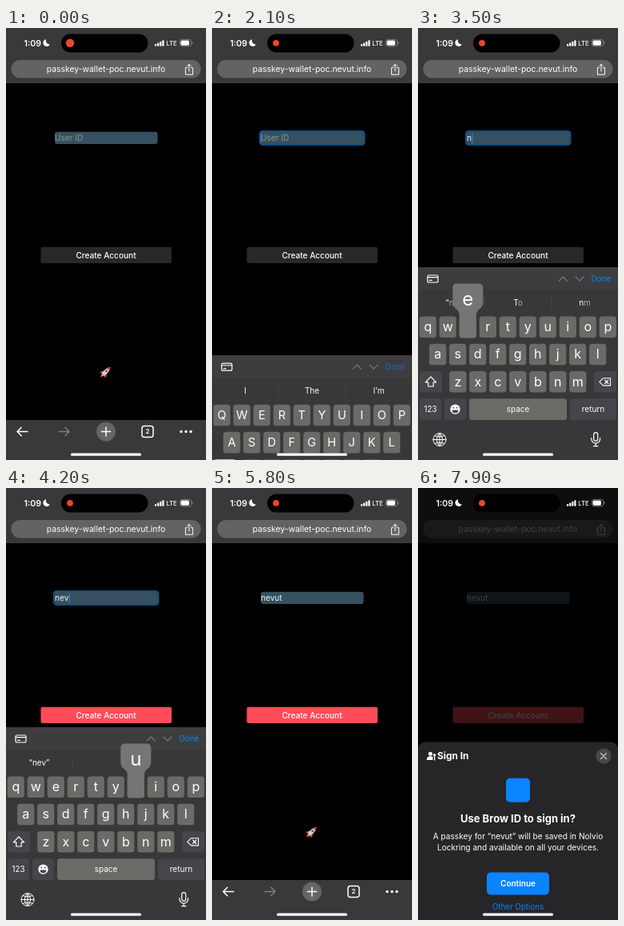
These frames come from a looping animation (250x540 px, 8000 ms). An HTML page:

```html
<!DOCTYPE html>
<html lang="en">
<head>
<meta charset="utf-8">
<title>Passkey sign-up</title>
<style>
html, body { margin: 0; width: 100%; height: 100%; overflow: hidden; background: #000; }
svg { display: block; width: 100%; height: 100%; }
text { font-family: Inter, "Open Sans", sans-serif; fill: #fff; }
.mid { text-anchor: middle; }
.line { fill: none; stroke: #fff; stroke-width: 1.5; stroke-linecap: round; stroke-linejoin: round; }
</style>
</head>
<body>
<svg id="stage" viewBox="0 0 250 540"></svg>
<script>
const LOOP = 8000, STEP = 100;
const USER = 'nevut';
const KEYBOARD_IN = 2000, SHIFT_OFF = 2900, KEYBOARD_OUT = 5300, SHEET_IN = 7400;
const KEY_PRESSES = [[3200, 3400], [3420, 3600], [3850, 4000], [4200, 4330], [4450, 4580]];
const BAR = '#39393b', KEY = '#6a6a67', FN_KEY = '#45454a', BLUE = '#0a84ff';

const label = (x, y, size, content, attrs = '') =>
  `<text x="${x}" y="${y}" font-size="${size}" ${attrs}>${content}</text>`;
const centred = (x, y, size, content, attrs = '') =>
  label(x, y, size, content, `class="mid" ${attrs}`);
const box = (x, y, w, h, r, fill, attrs = '') =>
  `<rect x="${x}" y="${y}" width="${w}" height="${h}" rx="${r}" fill="${fill}" ${attrs}/>`;
const line = (d, attrs = '') => `<path class="line" d="${d}" ${attrs}/>`;
const dot = (x, y, r, fill, attrs = '') => `<circle cx="${x}" cy="${y}" r="${r}" fill="${fill}" ${attrs}/>`;

const rows = [
  { letters: 'qwertyuiop', x: 12.3, y: 360.5 },
  { letters: 'asdfghjkl', x: 24.7, y: 394.7 },
  { letters: 'zxcvbnm', x: 49.8, y: 429 }
];
const keyAt = letter => {
  const row = rows.find(r => r.letters.includes(letter));
  return { x: row.x + row.letters.indexOf(letter) * 25, y: row.y };
};

function letterKeys() {
  return rows.map(row => [...row.letters].map(letter => {
    const { x, y } = keyAt(letter);
    return box(x - 10.6, y, 21.2, 26.6, 3.5, KEY) +
      centred(x, y + 18.6, 16, letter, `data-letter="${letter}"`);
  }).join('')).join('');
}

function statusBar() {
  const bars = [0, 1, 2, 3].map(i => box(186 + i * 3.1, 20 - i * 1.6, 2.2, 2.8 + i * 1.6, .7, '#fff')).join('');
  return label(22.5, 22.6, 10.6, '1:09', 'font-weight="600"') +
    '<path d="M50.2 14.2a4.4 4.4 0 1 0 4.6 6.2a4.5 4.5 0 0 1-4.6-6.2z" fill="#fff"/>' +
    box(69, 7.5, 108.5, 23, 11.5, '#000') + dot(80, 18.8, 4, '#e9472e', 'id="rec"') +
    bars + label(200.3, 22.3, 7.8, 'LTE', 'font-weight="500"') +
    box(217.3, 14.3, 14.4, 8.6, 2.7, 'none', 'stroke="#88888a" stroke-width=".8"') +
    box(218.5, 15.5, 10.5, 6.2, 1.6, '#fff') + box(232.4, 17, 1, 3.2, .5, '#88888a');
}

function page() {
  return box(0, 0, 250, 69, 0, BAR) + box(6.5, 40, 237, 22.5, 11, '#636361') +
    centred(125, 54.8, 10.4, `passkey-wallet-poc.${USER}.info`) +
    line('M226.4 49.6h-2v8.6h9v-8.6h-2M228.9 54v-8.4M226.6 47.6l2.3-2.3l2.3 2.3', 'style="stroke-width:1"') +
    box(59, 128, 132.5, 19, 4.5, '#10507f', 'id="ring"') +
    box(61, 129.7, 128.5, 15.4, 3, '#36505f') +
    '<text id="field" x="61" y="141.4" font-size="10.1"></text>' +
    box(0, 131.5, 1.2, 12, .5, '#3a78d8', 'id="caret"') +
    box(43.5, 273.7, 163.5, 20.3, 2, '#28282a', 'id="button"') +
    centred(125, 287.7, 10.1, 'Create Account', 'font-weight="500"') + rocket() + browserBar();
}

function rocket() {
  return `<g transform="translate(124.5 430) rotate(45)">
    <path d="M-1.7 4.5L0 9L1.7 4.5z" fill="#ff9b20"/>
    <path d="M-2.2 0L-4.6 3.2V6L-1.5 4.3H1.5L4.6 6V3.2L2.2 0z" fill="#d9382c"/>
    <path d="M0-8.5Q3.6-4 2.3 4.8H-2.3Q-3.6-4 0-8.5z" fill="#c9cfd0"/>
    <path d="M0-8.5Q1.7-6.6 2.3-4.6H-2.3Q-1.7-6.6 0-8.5z" fill="#d9382c"/>
    <circle cy="-1.6" r="1.4" fill="#31556e"/></g>`;
}

function browserBar() {
  return box(0, 490, 250, 50, 0, BAR) +
    line('M27 504.5H14M19.2 499.3L14 504.5L19.2 509.7') +
    line('M66 504.5H79M73.8 499.3L79 504.5L73.8 509.7', 'opacity=".35"') +
    dot(125, 504.5, 12, '#666668') + line('M119.5 504.5h11M125 499v11') +
    box(170, 497.5, 14, 14, 3, 'none', 'stroke="#fff" stroke-width="1.5"') +
    centred(177, 507.4, 8, '2', 'font-weight="600"') +
    [219, 225, 231].map(x => dot(x, 504.5, 1.7, '#fff')).join('');
}

function keyboard() {
  const y = 463.3;
  return box(0, 299, 250, 300, 0, '#38383a') + box(0, 299, 250, 28.5, 0, '#3d3d3f') +
    box(12, 309, 13, 9, 2, 'none', 'stroke="#fff" stroke-width="1.2"') +
    line('M12.5 311.6h12M14.5 315.4h3', 'style="stroke-width:1.2"') +
    line('M176.3 316l5-5l5 5M197 311l5 5l5-5', 'opacity=".3" style="stroke-width:1.2"') +
    label(216.5, 317, 10, 'Done', `id="done" style="fill:${BLUE}"`) +
    '<path d="M83 336v15M167 336v15" stroke="#4e4e50" stroke-width=".8"/>' +
    [41.5, 125, 208.5].map(x => centred(x, 347, 10, '', 'data-hint')).join('') +
    letterKeys() +
    box(2, 429, 28, 26.6, 3.5, FN_KEY, 'id="shiftKey"') +
    '<path id="shiftArrow" d="M16 436l6.7 6.8h-3.5v5.2h-6.4v-5.2h-3.5z" stroke-width="1.2" stroke-linejoin="round"/>' +
    box(220, 429, 28, 26.6, 3.5, FN_KEY) +
    line('M231.5 437.7h9v9.2h-9l-4.7-4.6zM233.5 440l4.4 4.5M237.9 440l-4.4 4.5', 'style="stroke-width:1.1"') +
    box(2, y, 27, 26.6, 3.5, FN_KEY) + centred(15.5, 480, 9.8, '123') +
    box(33, y, 27, 26.6, 3.5, FN_KEY) + dot(46.5, 476.6, 6.2, '#fff') +
    `<path d="M42.6 477.4h7.8a3.9 3.9 0 0 1-7.8 0z" fill="${FN_KEY}"/>` +
    dot(44.3, 474.6, .9, FN_KEY) + dot(48.7, 474.6, .9, FN_KEY) +
    box(64, y, 122, 26.6, 3.5, KEY) + centred(125, 480, 10, 'space') +
    box(190, y, 58, 26.6, 3.5, FN_KEY) + centred(219, 480, 10, 'return') +
    line('M19 514.5a8 8 0 1 0 16 0a8 8 0 1 0-16 0M19 514.5h16M27 506.5v16M27 506.5q-7.6 8 0 16q7.6-8 0-16M21 509.5q6 3 12 0M21 519.5q6-3 12 0', 'style="stroke-width:1"') +
    box(219.7, 505.7, 5, 10.5, 2.5, 'none', 'stroke="#fff" stroke-width="1.2"') +
    line('M216.8 512.6v1.2a5.4 5.4 0 0 0 10.8 0v-1.2M222.2 519.3v3.4M219.5 522.7h5.4', 'style="stroke-width:1.2"') +
    '<g id="popup"><path fill="#757573" d="M-14-41H14Q19-41 19-35.5V-17C19-9 10.6-10 10.6-2V23.5Q10.6 27 7 27H-7Q-10.6 27-10.6 23.5V-2C-10.6-10-19-9-19-17V-35.5Q-19-41-14-41z"/>' +
    centred(0, -14, 24, '') + '</g>';
}

function sheet() {
  return box(0, 317.3, 250, 260, 9, '#262528') +
    dot(15.5, 332, 2.5, '#fff') + '<path d="M10.8 339.7q0-4.700 4.700-4.700q2 0 3 1v3.700z" fill="#fff"/>' +
    dot(20.6, 333.5, 1.8, '#fff') + box(20, 334, 1.3, 6.3, .5, '#fff') +
    label(24, 338.8, 11.9, 'Sign In', 'font-weight="700"') +
    dot(232, 334.8, 9.6, '#48484b') +
    line('M228.6 331.4l6.8 6.8M235.4 331.4l-6.8 6.8', 'style="stroke-width:1.3;stroke:#cfcfd2"') +
    box(110, 362.5, 30, 30, 5, BLUE) +
    centred(125, 417.6, 13, 'Use Brow ID to sign in?', 'font-weight="700"') +
    centred(125, 438.6, 10.1, `A passkey for “${USER}” will be saved in Nolvio`) +
    centred(125, 452.6, 10.1, 'Lockring and available on all your devices.') +
    box(86, 480.2, 78, 28, 5, BLUE) + centred(125, 497.9, 10, 'Continue', 'font-weight="600"') +
    centred(125, 527.2, 9.8, 'Other Options', `style="fill:${BLUE}"`);
}

const stage = document.getElementById('stage');
stage.innerHTML = box(0, 0, 250, 540, 0, '#000') + page() +
  `<g id="keyboard">${keyboard()}</g>` +
  box(0, 0, 250, 540, 0, '#000', 'id="dim"') + statusBar() +
  `<g id="sheet">${sheet()}</g>` + box(81, 531.6, 88, 3.2, 1.6, '#fff');

const $ = id => document.getElementById(id);
const set = (el, attrs) => { for (const name in attrs) el.setAttribute(name, attrs[name]); };
const clamp = v => Math.min(1, Math.max(0, v));
const progress = (t, start, length) => clamp((t - start) / length);
const mix = (a, b, k) => `rgb(${a.map((v, i) => Math.round(v + (b[i] - v) * k))})`;
// Critically damped spring, from 0 to 1
const spring = (t, start) => {
  const x = Math.max(0, t - start) * .01826;
  return 1 - (1 + x) * Math.exp(-x);
};
const letters = stage.querySelectorAll('[data-letter]');
const hints = stage.querySelectorAll('[data-hint]');

function drawField(t, typed, focused) {
  const field = $('field');
  field.textContent = typed || 'User ID';
  field.style.fill = typed ? '#f4f4f0' : '#869a80';
  set($('ring'), { opacity: focused ? 1 : 0 });
  const caretX = typed ? 61.3 + field.getComputedTextLength() : 60.5;
  set($('caret'), { x: caretX, opacity: focused ? 1 : 0 });
  set($('button'), { fill: mix([40, 40, 42], [255, 76, 88], progress(t, 3600, 200)) });
}

function drawHints(t, typed) {
  const first = typed.length === 1;
  const words = !typed ? ['I', 'The', 'I’m'] : [`“${typed}”`, ...(first ? ['To', 'nm'] : ['', ''])];
  const fade = first ? .3 + .7 * progress(t, KEY_PRESSES[0][1], 250) : 1;
  hints.forEach((el, i) => {
    el.innerHTML = `${words[i].slice(0, 1)}<tspan fill-opacity="${fade}">${words[i].slice(1)}</tspan>`;
  });
}

function drawKeyboard(t, typed) {
  const shown = spring(t, KEYBOARD_IN) - spring(t, KEYBOARD_OUT);
  set($('keyboard'), { transform: `translate(0 ${(1 - shown) * 242})`, opacity: shown > .004 ? 1 : 0 });
  set($('done'), { opacity: t >= 5100 ? .45 : .5 + .5 * progress(t, KEYBOARD_IN, 400) });

  const upper = t < SHIFT_OFF;
  set($('shiftKey'), { fill: upper ? '#e6e6e4' : FN_KEY });
  set($('shiftArrow'), { fill: upper ? '#000' : 'none', stroke: upper ? '#000' : '#fff' });

  const active = USER[KEY_PRESSES.findIndex(([down, up]) => t >= down && t < up)];
  for (const el of letters) {
    const letter = el.dataset.letter;
    el.textContent = upper ? letter.toUpperCase() : letter;
    set(el, { 'font-size': upper ? 14.5 : 16, opacity: letter === active ? 0 : 1 });
  }
  const popup = $('popup');
  set(popup, { opacity: active ? 1 : 0 });
  if (active) {
    const key = keyAt(active);
    set(popup, { transform: `translate(${key.x} ${key.y})` });
    popup.lastChild.textContent = active;
  }
  drawHints(t, typed);
}

function draw(t) {
  const typed = USER.slice(0, KEY_PRESSES.filter(([, up]) => t >= up).length);
  drawField(t, typed, t >= KEYBOARD_IN && t < KEYBOARD_OUT);
  drawKeyboard(t, typed);
  set($('rec'), { r: 5.2 - 1.3 * progress(t, 0, 600) });
  const open = spring(t, SHEET_IN);
  set($('sheet'), { transform: `translate(0 ${(1 - open) * 222})`, opacity: open > 0 ? 1 : 0 });
  set($('dim'), { opacity: .75 * open });
}

function tick() {
  draw(Math.floor(performance.now() % LOOP / STEP) * STEP);
  requestAnimationFrame(tick);
}
tick();
</script>
</body>
</html>
```
